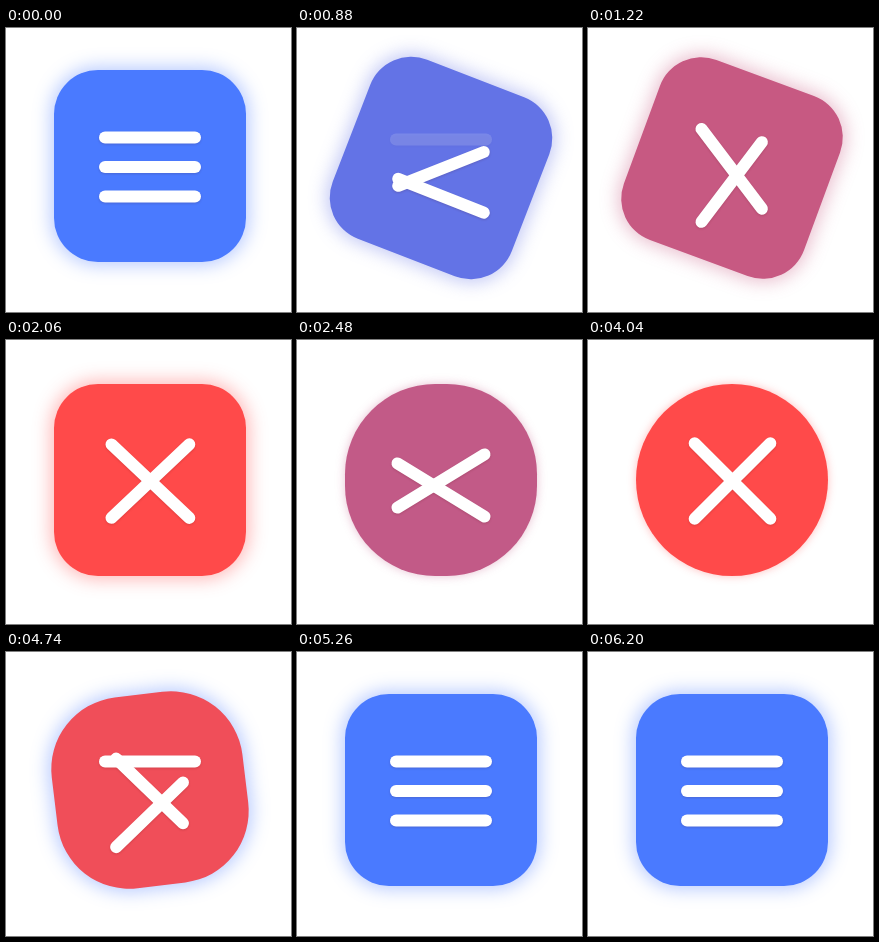
Write an HTML page that moves like this. It is 285 px wide and 284 px high and loops after 6220 ms.

```html
<!DOCTYPE html>
<html lang="en">
<head>
<meta charset="utf-8">
<style>
  html, body { margin: 0; width: 100%; height: 100%; overflow: hidden; background: #fff; }
  #button, #icon { position: absolute; left: 48px; top: 44px; width: 192px; height: 192px; }
  #icon { filter: drop-shadow(0 1px 1px rgba(60, 0, 0, .16)); }
  #icon i { position: absolute; left: 45px; top: 90.5px; width: 102px; height: 12px; border-radius: 6px; background: #fff; }
</style>
</head>
<body>
<div id="button"></div>
<div id="icon"><i></i><i></i><i></i></div>
<script>
const LOOP = 6220;
const BLUE = [74, 122, 255], RED = [255, 74, 74];
const button = document.getElementById('button');
const icon = document.getElementById('icon');
const [top_, middle, bottom] = icon.children;

const mix = (a, b, p) => a + (b - a) * p;
const tint = p => BLUE.map((c, i) => Math.round(mix(c, RED[i], p))).join(',');
const clamp = (t, a, b) => Math.min(1, Math.max(0, (t - a) / (b - a)));
const smooth = (t, a, b) => { const s = clamp(t, a, b); return s * s * (3 - 2 * s); };

// CSS "ease": solve the bezier's x for time, then return its y
function ease(t, a, b) {
  const x = clamp(t, a, b);
  let lo = 0, hi = 1;
  for (let i = 0; i < 20; i++) {
    const u = (lo + hi) / 2;
    if (.75 * u * (1 - u) + u * u * u < x) lo = u; else hi = u;
  }
  return .3 * lo * (1 - lo) ** 2 + 3 * lo * lo * (1 - lo) + lo ** 3;
}

// Up and down between 0 and 1: on, off, on, off
const toggle = (t, on1, off1, on2, off2) =>
  smooth(t, ...on1) - smooth(t, ...off1) + smooth(t, ...on2) - smooth(t, ...off2);

function cross(t) {
  const spinIn = ease(t, 730, 2230);
  const close = smooth(t, 2240, 2900);
  const open = smooth(t, 3100, 3580);
  const spinOut = smooth(t, 4390, 4880);
  if (t < 2240) return { p: spinIn, angle: -225 * spinIn };
  if (t < 3100) return { p: 1 - close, angle: -45 * (1 - close) };
  if (t < 4390) return { p: open, angle: 45 * open };
  return { p: 1 - spinOut, angle: 225 * (1 - spinOut) };
}

function place(bar, y, angle, scale) {
  bar.style.width = 102 + 17 * scale + 'px';
  bar.style.left = 45 - 8.5 * scale + 'px';
  bar.style.transform = `translateY(${y}px) rotate(${angle}deg)`;
}

function draw(t) {
  const lift = -2 * (1 - smooth(t, 300, 680) + smooth(t, 4390, 4600));
  const round = smooth(t, 2180, 2560) - smooth(t, 4390, 5130);
  const small = smooth(t, 2180, 2540) - smooth(t, 4390, 4680);
  const turn = 180 * (smooth(t, 680, 1620) + smooth(t, 4390, 5130));
  const fill = toggle(t, [680, 1540], [2240, 2860], [3360, 3900], [4650, 5160]);
  const glow = toggle(t, [680, 1540], [2240, 2860], [3360, 3900], [4390, 4680]);

  const s = button.style;
  s.transform = `translateY(${lift}px) rotate(${turn}deg)`;
  s.borderRadius = mix(44, 96, round) + 'px';
  s.background = `rgb(${tint(fill)})`;
  s.boxShadow = `0 0 ${mix(18, 9, small)}px ${mix(3, 0, small)}px rgba(${tint(glow)},${mix(.4, .36, small)})`;

  icon.style.transform = `translateY(${lift}px)`;
  const { p, angle } = cross(t);
  place(top_, -29.5, 0, 0);
  top_.style.opacity = 1 - toggle(t, [730, 930], [2600, 2800], [3100, 3240], [4480, 4660]);
  place(middle, 0, angle, p);
  place(bottom, 29.5 * (1 - p), -angle, p);
}

const start = performance.now();
function tick() {
  draw((performance.now() - start) % LOOP);
  requestAnimationFrame(tick);
}
tick();
</script>
</body>
</html>
```
